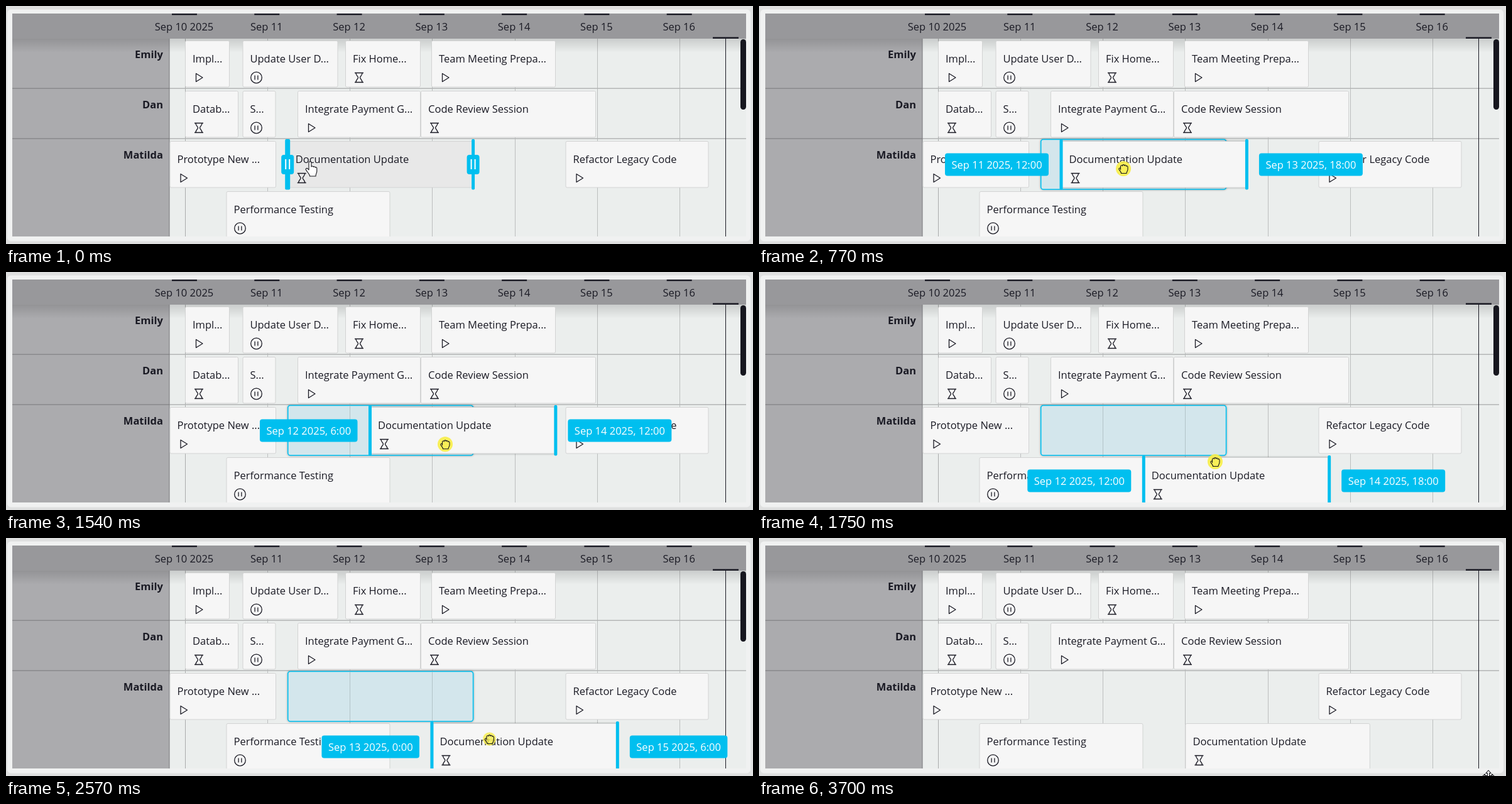
An HTML page for the animation above (3.77 s loop, 1189 by 379 pixels).

```html
<!DOCTYPE html>
<html lang="en">
<head>
<meta charset="utf-8">
<title>Scheduler drag</title>
<style>
html, body { margin: 0; width: 100%; height: 100%; overflow: hidden; background: #dfe0e0; }
svg { display: block; width: 1189px; height: 379px; }
text { font: 16.5px "Open Sans", "Noto Sans", sans-serif; fill: #1a1a24; }
.name { font-weight: 700; text-anchor: end; }
.day { text-anchor: middle; }
.tip { fill: #fff; }
.icon { fill: none; stroke: #1a1a24; stroke-width: 1.3; stroke-linejoin: round; }
</style>
</head>
<body>
<svg viewBox="0 0 1189 379">
  <defs>
    <clipPath id="body"><rect x="10" y="52" width="1168" height="315"/></clipPath>
    <linearGradient id="shade" x2="0" y2="1">
      <stop offset="0" stop-opacity=".14"/><stop offset="1" stop-opacity="0"/>
    </linearGradient>
    <filter id="soft" x="-5%" y="-15%" width="110%" height="130%">
      <feDropShadow dx="0" dy="0" stdDeviation="1.8" flood-opacity=".4"/>
    </filter>
  </defs>
  <g id="board"></g>
  <g id="live" clip-path="url(#body)"></g>
  <rect id="thumb" x="1169" y="53" width="9" height="112" rx="4.5" fill="#17171f"/>
  <g id="pointer"></g>
</svg>
<script>
const LOOP = 3770, TICK = 70, DAY = 131.28, STEP = DAY / 4;
const CYAN = '#00bfef', INK = '#1a1a24';
const START = 448.2, SPAN = STEP * 9, PRESS = 556;
const DRAG = 630, FADE = 2570, DROP = 2900;
const $ = id => document.getElementById(id);

const rect = (x, y, w, h, fill, more = '') =>
  `<rect x="${x}" y="${y}" width="${w}" height="${h}" fill="${fill}" ${more}/>`;
const text = (x, y, s, cls = '') => `<text x="${x}" y="${y}" class="${cls}">${s}</text>`;

const icons = {
  play: '<path d="M-4.5-6.5 6 0-4.5 6.5Z"/>',
  pause: '<circle r="8.8"/><path d="M-2.4-3.5v7M2.4-3.5v7"/>',
  wait: '<path d="M-7-7.5H7M-7 7.5H7M-5-7.5C-5-3-1.5-2-1.5 0S-5 3-5 7.5M5-7.5C5-3 1.5-2 1.5 0S5 3 5 7.5"/>'
};

function item(x, y, w, title, icon, fill = '#f6f6f6', more = '') {
  return rect(x + .5, y + .5, w - 1, 73.5, fill, `stroke="#d2d3d3" rx="2" ${more}`) +
    text(x + 12, y + 35, title) +
    `<g class="icon" transform="translate(${x + 22} ${y + 59})">${icons[icon]}</g>`;
}

const tasks = [
  [285, 55, 71, 'Impl...', 'play'],
  [376.5, 55, 152, 'Update User D...', 'pause'],
  [540, 55, 120, 'Fix Home...', 'wait'],
  [677, 55, 198, 'Team Meeting Prepa...', 'play'],
  [285, 135, 85, 'Datab...', 'wait'],
  [376.5, 135, 53, 'S...', 'pause'],
  [464, 135, 196, 'Integrate Payment G...', 'play'],
  [660, 135, 279, 'Code Review Session', 'wait'],
  [260.5, 215, 169.5, 'Prototype New ...', 'play'],
  [890.5, 215, 228, 'Refactor Legacy Code', 'play'],
  [350.5, 295, 261, 'Performance Testing', 'pause']
];

function board() {
  let s = rect(2, 5.5, 1183, 369, '#f0f1f1', 'rx="6"') +
    rect(10, 52, 1168, 315, '#ebeeed') +
    rect(10, 52, 250, 315, '#ababae') +
    rect(10, 12, 1168, 40, '#98989b');
  for (let d = 0; d < 7; d++) {
    const x = 284.5 + d * DAY;
    s += rect(Math.round(x), 52, 1, 315, d ? '#bcbebe' : '#a9abab') +
      rect(x - 20.5, 12, 40, 2.4, INK) +
      text(x - 1, 39, `Sep ${10 + d}${d ? '' : ' 2025'}`, 'day');
  }
  s += rect(10, 52, 1168, 22, 'url(#shade)');
  for (const y of [130.5, 210.5])
    s += rect(10, y, 250, 1.5, '#89898c') + rect(260, y, 918, 1.5, '#b3b5b5');
  s += rect(259.5, 52, 1, 315, '#77777a');
  ['Emily', 'Dan', 'Matilda'].forEach((n, i) => s += text(250, 83 + i * 80, n, 'name'));
  s += rect(1125, 49.5, 41, 2.5, INK) + rect(1145, 52, 1, 315, INK);
  return s + `<g clip-path="url(#body)">${tasks.map(a => item(...a)).join('')}</g>`;
}

// time, x, y of the hotspot
const path = [
  [0, 484, 248], [560, 553, 255], [630, 556, 256], [770, 580, 259],
  [1130, 636, 262], [1190, 670.5, 264], [1340, 690, 265], [1470, 690, 265],
  [1750, 726, 302], [2030, 735, 299], [2310, 769.5, 320],
  [3360, 769.5, 320], [3710, 1161, 380]
];

function hotspot(t) {
  const i = path.findIndex(p => p[0] > t);
  if (i < 0) return path[path.length - 1].slice(1);
  const [t0, x0, y0] = path[i - 1], [t1, x1, y1] = path[i];
  const k = (t - t0) / (t1 - t0);
  return [x0 + (x1 - x0) * k, y0 + (y1 - y0) * k];
}

const bar = (x, y, w = 5) => rect(x - w / 2, y - 3, w, 80.5, CYAN, 'rx="2"');

const handle = (x, y, w) => bar(x, y, w) +
  rect(x - 10, y + 22, 20, 31, CYAN, 'rx="4"') +
  rect(x - 4, y + 29, 2, 16, '#fff') + rect(x + 2, y + 29, 2, 16, '#fff');

const stamp = h => `Sep ${11 + Math.floor(h / 24)} 2025, ${h % 24}:00`;

function tip(edge, y, hours, side) {
  const s = stamp(hours), w = s.length > 17 ? 165 : 155.5;
  const x = side < 0 ? edge - 20 - w : edge + 19.5;
  return rect(x, y + 19.5, w, 36, CYAN, 'rx="4"') + text(x + 10.5, y + 44, s, 'tip');
}

const shapes = {
  hand: ['#fff', 'M-2 1.5C-2-.8 2-.8 2 1.5V8C2 6.5 5 6.6 5.2 8.4 5.5 7.2 8 7.4 8.2 9.2 8.6 8.2 10.8 8.6 10.8 10.6V15C10.8 18 9 19 9 23H-.5C-.5 20-4 17-6.5 13-7.6 11-5.2 9.6-3.8 11L-2 13Z'],
  fist: ['none', 'M-4.5 1.5V-3.5C-4.5-5.8-1.7-5.8-1.6-4.2-1.5-7 1.3-7 1.5-4.6 1.8-6.4 4.3-6.2 4.4-3.8 5-5 7-4.5 7-2.5V1C7 4 5.2 4.5 5 7.5H-3.5C-3.5 5-6 3.5-7 1-7.6-1-5.5-1.6-4.5 0Z'],
  arrow: ['#fff', 'M0 0V17L4 13.2 6.6 19.4 9.3 18.3 6.7 12.2H12Z'],
  move: ['#fff', 'M0-10 4-5.5H1.5V-1.5H5.5V-4L10 0 5.5 4V1.5H1.5V5.5H4L0 10-4 5.5H-1.5V1.5H-5.5V4L-10 0-5.5-4V-1.5H-1.5V-5.5H-4Z']
};

function render(t) {
  const [px, py] = hotspot(Math.floor((t + 10) / TICK) * TICK);
  const drag = t >= DRAG && t < DROP;
  const hover = !drag && px < 973;
  const n = t < DRAG ? 0 : t >= FADE ? 7 : Math.round((px - PRESS) / STEP);
  const y = t >= DRAG && py > 291 ? 295 : 215;
  const x = START + n * STEP, end = x + SPAN;

  let s = '';
  if (drag)
    s += rect(START + .5, 212.5, SPAN - .5, 79.5, '#d3e6ec', `rx="4" stroke="${CYAN}" stroke-width="1.6" filter="url(#soft)"`) +
      [547, 678].map(v => rect(v, 213, 1, 78, '#b2c3c8')).join('');
  s += item(x + .5, y, SPAN - 1, 'Documentation Update', 'wait', hover ? '#e8e8e8' : '#f6f6f6',
    drag ? 'filter="url(#soft)"' : '');
  if (hover) s += handle(x, y, t < TICK ? 8 : 5) + handle(end, y);
  if (drag)
    s += bar(x, y) + bar(end, y) + tip(x, y, 6 + n * 6, -1) + tip(end, y, 60 + n * 6, 1);
  $('live').innerHTML = s;

  const kind = drag ? 'fist' : hover ? 'hand' : px > 1150 ? 'move' : 'arrow';
  const [fill, d] = shapes[kind];
  const glow = drag ? `<circle r="${t < FADE ? 12 : 10.5}" fill="#f7ee4a" opacity="${t < FADE ? .92 : .8}"/>` : '';
  $('pointer').innerHTML = `<g transform="translate(${px} ${py})">${glow}` +
    `<path d="${d}" fill="${fill}" stroke="#15151a" stroke-width="1.1" stroke-linejoin="round"/></g>`;
  $('thumb').style.display = kind === 'move' ? 'none' : '';
}

$('board').innerHTML = board();
const begin = performance.now();
function loop() {
  render((performance.now() - begin) % LOOP);
  requestAnimationFrame(loop);
}
loop();
</script>
</body>
</html>
```
